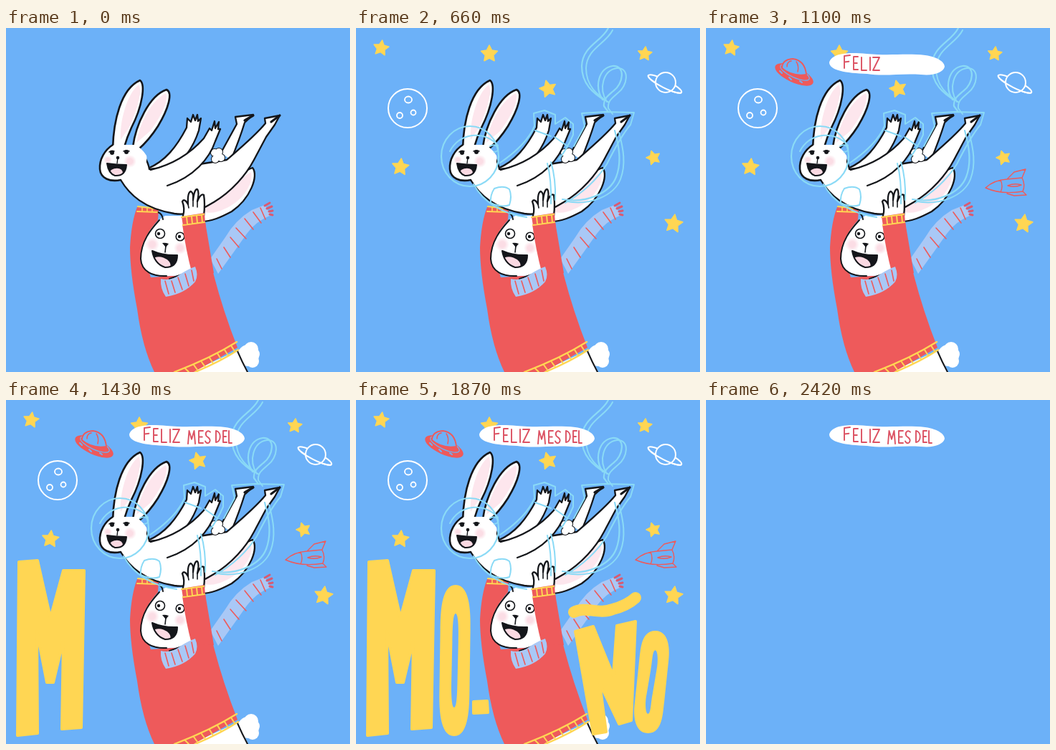
Recreate the animation shown at these times as an HTML page with a canvas. Size 480x480 px, loop 2.53 s.

```html
<!DOCTYPE html>
<html lang="es">
<head>
<meta charset="utf-8">
<title>Feliz mes del mo-ño</title>
<style>
html, body { margin: 0; width: 100%; height: 100%; overflow: hidden; background: #6cb1f8; }
canvas { display: block; width: 480px; height: 480px; }
</style>
</head>
<body>
<canvas width="480" height="480" role="img" aria-label="FELIZ MES DEL MO-ÑO!"></canvas>
<script>
const ctx = document.querySelector('canvas').getContext('2d');
const SKY = '#6cb1f8', RED = '#ee5a5b', YELLOW = '#ffd653', INK = '#14161a',
      PINK = '#fde6ed', WOOL = '#a9c8f6', SUIT = '#8adaf6', WHITE = '#fff';
const STEP = 110, STEPS = 23;

ctx.lineCap = ctx.lineJoin = 'round';

function fill(d, color) {
  ctx.fillStyle = color;
  ctx.fill(new Path2D(d), 'evenodd');
}

function line(d, color = INK, width = 2) {
  ctx.strokeStyle = color;
  ctx.lineWidth = width;
  ctx.stroke(new Path2D(d));
}

function shape(d, color = WHITE, ink = INK, width = 2.3) {
  fill(d, color);
  line(d, ink, width);
}

function oval(x, y, rx, ry = rx, turn = 0, from = 0, to = Math.PI * 2) {
  const p = new Path2D();
  p.ellipse(x, y, rx, ry, turn, from, to);
  return p;
}

function dot(x, y, r, color) {
  ctx.fillStyle = color;
  ctx.fill(oval(x, y, r));
}

function ring(x, y, rx, ry, color, width, ...arc) {
  ctx.strokeStyle = color;
  ctx.lineWidth = width;
  ctx.stroke(oval(x, y, rx, ry, ...arc));
}

function blush(x, y, r) {
  const g = ctx.createRadialGradient(x, y, r * .4, x, y, r);
  g.addColorStop(0, '#fbdde5');
  g.addColorStop(1, '#fbdde500');
  dot(x, y, r, g);
}

function mouth(d, x, y, rx, ry, turn) {
  ctx.save();
  fill(d, INK);
  ctx.clip(new Path2D(d));
  ctx.fillStyle = '#fbd9e2';
  ctx.fill(oval(x, y, rx, ry, turn));
  ctx.restore();
  line(d);
}

function bigBunny() {
  for (const [x, y, r] of [[338, 457, 15], [342, 448, 10], [346, 455, 8], [344, 465, 9]]) dot(x, y, r, WHITE);
  fill('M258 480L323 450L338 480Z', WHITE);
  line('M323 451Q329 465 337 480');

  // trailing scarf
  fill('M285 322L306 292Q320 268 343 254L361 247L370 261Q348 270 336 287L319 311L296 343Z', WOOL);
  line('M294 322L301 336M304 306L313 320M313 292L325 306M321 279L335 294M333 266L345 281M345 257L356 272M355 251L362 267', RED, 1.6);
  line('M361 248L368 244M364 252L371 249M367 256L372 255M368 260L372 261', '#d95a72', 3);

  shape('M276 247C300 232 325 201 344 195C353 206 341 238 315 256C300 264 287 270 272 270');
  fill('M280 245C304 234 322 212 342 201C346 220 327 243 306 252Q290 260 277 257Z', PINK);

  fill('M183 250L213 253L212 268Q193 290 191 312L202 348L258 344L246 274L278 270Q282 315 290 345Q303 395 323 446L262 480H207Q190 445 183 392Q173 340 173 306Q175 270 183 250Z', RED);
  line('M235 480Q285 461 322 438M264 480Q300 465 324 449', YELLOW, 2.4);
  line('M250 475L255 480M262 470L267 477M273 466L278 473M284 460L289 468M295 454L300 462M305 449L310 457M314 443L319 451', YELLOW, 2);

  fill('M222 262C204 272 188 297 188 322C189 340 207 347 225 346L262 345L255 262Z', WHITE);
  line('M214 268C202 281 188 298 188 322C189 340 205 347 224 346M212 257Q218 259 219 267M228 350L251 342');
  blush(204, 302, 10);
  blush(243, 307, 9);
  for (const [x, y, r, px] of [[215, 287, 6.5, 213], [243, 291, 5.8, 242]]) {
    dot(x, y, r, WHITE);
    ring(x, y, r, r, INK, 1.6);
    dot(px, y, 2.2, INK);
  }
  fill('M218 300Q222 299 227 301L223 306Z', INK);
  line('M223 304L222 313', INK, 1.6);
  mouth('M204 311Q220 318 239 317Q239 334 222 334Q207 329 204 311Z', 217, 328, 13, 8, .35);

  fill('M246 274L278 271L290 342L259 340Q251 310 246 274Z', RED);
  fill('M216 350Q230 354 244 343Q255 336 264 333Q269 345 264 354Q249 371 223 375Q215 364 216 350Z', WOOL);
  line('M222 353L227 371M231 353L236 369M240 348L246 365M250 343L255 360M259 338L262 353', RED, 1.6);
  line('M184 249L211 252M183 256L211 257', YELLOW);
  line('M190 250V256M197 250V256M204 251V256', YELLOW, 1.6);
}

function flyingBunny() {
  shape('M300 174L322 134L320 124L345 121L333 132Q326 155 314 184');
  shape('M198 196C222 186 238 166 252 139L253 126L258 131L261 121L264 129L267 121L268 130L272 126L269 143C262 165 250 185 225 202');
  shape('M160 212C172 232 192 252 235 259C260 262 275 252 290 243C315 228 335 205 346 184L363 152L375 135L382 122L361 126L362 133C348 150 330 165 308 184L270 190L200 197C198 185 190 172 180 165L150 200Z');
  line('M345 122L333 129M382 122L370 131', INK, 3.2);
  const tail = [[291, 174, 5], [297, 173, 5], [300, 181, 5], [292, 183, 5]];
  for (const [x, y, r] of tail) dot(x, y, r + 1, INK);
  for (const [x, y, r] of tail) dot(x, y, r, WHITE);
  dot(296, 179, 5, WHITE);
  shape('M202 198C235 190 260 172 276 154L284 140L287 143L291 130L292 140L297 131L296 141L299 141L292 158C284 182 262 208 225 220');

  shape('M149 168C150 130 160 85 187 73C195 79 190 110 175 139Q169 152 165 166', WHITE, INK, 2.6);
  shape('M177 166C181 135 200 94 224 86C233 90 227 112 212 137Q200 156 184 170', WHITE, INK, 2.6);
  fill('M160 156C158 133 168 93 185 79C191 88 182 117 171 140Z', PINK);
  fill('M182 160C187 132 202 102 223 91C228 103 213 128 201 144Z', PINK);
  fill('M149 163C138 170 130 183 131 197C132 210 145 215 160 212C185 210 199 190 196 178Q190 168 180 163Z', WHITE);
  line('M149 163C138 170 130 183 131 197C132 210 145 215 160 212', INK, 2.6);
  blush(173, 186, 9);
  blush(142, 184, 6);
  dot(148, 174, 3, INK);
  dot(168, 173, 3, INK);
  line('M144 173Q147 170 151 172M164 172Q168 170 172 172', INK, 1.5);
  dot(156, 181, 2.3, INK);
  line('M156 181L155 189', INK, 1.4);
  mouth('M141 189Q155 191 168 191Q167 207 152 206Q143 203 141 189Z', 153, 203, 10, 7, -.3);
}

function frontHand() {
  shape('M247 262Q250 252 246 242Q249 237 254 246Q253 229 258 228Q262 230 261 240Q263 224 267 225Q270 229 267 242Q272 230 276 233Q278 245 276 262');
  line('M254 246L255 251M261 240V249M267 242V250', INK, 1.6);
  fill('M245 263L277 258L278 273L247 276Z', RED);
  line('M245 264L276 260M247 275L277 271M252 264L253 273M259 263L260 273M266 262L267 272M273 261L274 271', YELLOW, 2);
}

function spaceSuit() {
  ring(159, 179, 40, 42, SUIT, 2.2);
  line('M131 172Q141 153 162 150Q184 148 198 164M187 165Q193 161 198 166Q200 172 193 173', SUIT);
  line('M201 188Q238 163 249 137L248 119L263 115L278 121L278 134L292 125L303 134L303 149Q295 168 283 183', SUIT);
  line('M250 143L272 151M277 152L294 164', SUIT);
  line('M304 165L319 137L315 119L347 117L388 118L383 135Q370 150 350 190Q329 223 292 244M164 218Q185 256 238 264', SUIT);
  line('M272 187Q279 210 278 240M267 189Q273 212 272 245M193 224Q206 219 214 225Q218 235 214 247Q203 251 188 244Q187 233 193 224', SUIT);
}

function airTube() {
  const d = 'M352 0C343 19 316 25 315 53C315 78 331 91 347 101M344 100C332 81 339 56 358 53C377 52 373 78 359 88C351 95 345 99 346 109L352 117M361 143C367 165 371 187 363 208C354 231 321 245 288 239';
  line(d, SUIT, 2.2);
  ctx.save();
  ctx.translate(6, 3);
  line(d, SUIT, 2);
  ctx.restore();
}

function star(x, y, r, turn) {
  let d = '';
  for (let i = 0; i < 10; i++) {
    const a = turn + i * Math.PI / 5 - Math.PI / 2, q = i % 2 ? r * .5 : r;
    d += (i ? 'L' : 'M') + (x + q * Math.cos(a)) + ' ' + (y + q * Math.sin(a));
  }
  shape(d + 'Z', YELLOW, YELLOW, 1.6);
}

function stars(...list) {
  for (const s of list) star(...s);
}

function moonAndPlanet() {
  ring(72, 112, 27, 27, WHITE, 2);
  ring(73, 100, 5, 4.5, WHITE, 1.8);
  ring(61, 122, 4, 4, WHITE, 1.8);
  ring(80, 118, 3.5, 3.5, WHITE, 1.8);

  const tilt = .47;
  ring(431, 78, 26, 5.5, WHITE, 2, tilt);
  dot(432, 76, 14, SKY);
  ring(432, 76, 14, 14, WHITE, 2);
  ring(431, 78, 26, 5.5, WHITE, 2, tilt, 0, Math.PI);
}

function saucer() {
  ctx.fillStyle = RED;
  ctx.fill(oval(123, 65, 29, 11, .43));
  ring(124, 62, 22, 7, SKY, 1.2, .43);
  shape('M106 56Q106 44 121 43Q138 45 140 65Q120 68 106 56Z', SKY, RED, 1.8);
  line('M113 54Q113 47 119 46M128 61Q130 53 126 47', RED, 1.4);
  line('M103 60L106 63M116 69L119 72M131 74L134 76', SKY, 2);
}

function rocket() {
  line('M390 223Q402 212 420 211L441 209Q446 219 442 228Q412 233 390 223ZM411 212Q415 221 411 229M420 211L430 201L446 197L441 209M420 231L430 234L447 233L442 228M421 220Q430 216 440 219Q431 223 421 220', RED, 1.4);
}

function banner() {
  fill('M172 48C175 36 196 33 224 36C258 39 278 35 306 38C325 41 333 48 333 54C331 62 318 67 300 65C270 63 250 68 225 64C195 63 172 59 172 48Z', WHITE);
}

const GLYPHS = {
  F: 'M0 1V0H1M0 .5H.8', E: 'M1 0H0V1H1M0 .5H.8', L: 'M0 0V1H1', I: 'M.5 0V1',
  Z: 'M0 0H1L0 1H1', M: 'M0 1L.15 0L.5 .65L.85 0L1 1',
  S: 'M1 .1C.4 -.15 -.1 .2 .2 .4C.5 .55 1 .6 .95 .8C.8 1.1 .2 1.05 0 .85',
  D: 'M0 0V1C1.25 .95 1.3 .1 0 0'
};

function letter(char, x, y, w, h, tilt = 0) {
  const p = new Path2D();
  p.addPath(new Path2D(GLYPHS[char]), new DOMMatrix([w, tilt, 0, h, x, y]));
  ctx.strokeStyle = '#dc5263';
  ctx.lineWidth = 1.9;
  ctx.stroke(p);
}

function letters(...list) {
  for (const l of list) letter(...l);
}

function narrowO(x, y, w, h, slant) {
  const loop = (l, t, r, b, k) => {
    const m = (l + r) / 2, c = (b - t) * .2;
    return `M${m + k} ${t}C${r + k} ${t} ${r + k} ${t + c} ${r + k * .6} ${t + c * 1.5}L${r - k * .6} ${b - c * 1.5}C${r - k} ${b - c} ${r - k} ${b} ${m - k} ${b}C${l - k} ${b} ${l - k} ${b - c} ${l - k * .6} ${b - c * 1.5}L${l + k * .6} ${t + c * 1.5}C${l + k} ${t + c} ${l + k} ${t} ${m + k} ${t}Z`;
  };
  const side = w * .4, end = h * .19;
  fill(loop(x, y, x + w, y + h, slant) + loop(x + side, y + end, x + w - side, y + h - end, slant), YELLOW);
}

function bigEnye() {
  line('M304 296C320 287 338 300 358 292Q378 287 390 276', YELLOW, 16);
  shape('M306 323L331 316L359 385L364 315L390 309L384 447L367 452L340 395L349 463L331 466Z', YELLOW, YELLOW, 4);
}

function exclamation() {
  line('M451 303L473 301L464 436L445 438Z', YELLOW, 4.5);
  ring(452, 455, 7.5, 8, YELLOW, 5);
}

// Each layer appears at its step and stays until the final blank beat.
const layers = [
  [0, bigBunny], [0, flyingBunny], [0, frontHand],
  [1, spaceSuit],
  [2, airTube],
  [3, () => stars([35, 28, 11, .15], [186, 36, 12, 0])],
  [4, () => stars([268, 85, 12, -.25], [403, 36, 10, .1])],
  [5, () => stars([62, 194, 12, .1], [415, 181, 10, -.3], [443, 273, 13, .15])],
  [6, moonAndPlanet],
  [7, saucer],
  [8, rocket],
  [9, banner],
  [10, () => letters(['F', 193, 39, 8, 17, -1], ['E', 206, 40, 6, 18], ['L', 217, 41, 7, 18], ['I', 226, 41, 6, 18], ['Z', 233, 41, 9, 18])],
  [11, () => letters(['M', 254, 43, 10, 18], ['E', 269, 43, 6, 17], ['S', 278, 43, 7, 17])],
  [12, () => letters(['D', 293, 43, 6, 16], ['E', 303, 43, 5, 16], ['L', 311, 43, 4, 17])],
  [13, () => shape('M18 226L44 224L62 304L80 238L109 238L105 457L78 459L80 335L66 394L57 394L43 322L44 465L16 468Z', YELLOW, YELLOW, 4)],
  [14, () => narrowO(117, 258, 42, 211, 1)],
  [15, () => shape('M164 421L183 420L184 436L164 437Z', YELLOW, YELLOW, 4)],
  [16, bigEnye],
  [17, () => narrowO(392, 322, 41, 143, 5)],
  [18, exclamation]
];

function draw(step) {
  ctx.fillStyle = SKY;
  ctx.fillRect(0, 0, 480, 480);
  const blank = step === STEPS - 1;
  for (const [from, paint] of layers) {
    if (blank ? from >= 9 && from <= 12 : from <= step) paint();
  }
}

const start = performance.now();
function tick() {
  draw(Math.floor((performance.now() - start) / STEP) % STEPS);
  requestAnimationFrame(tick);
}
tick();
</script>
</body>
</html>
```
